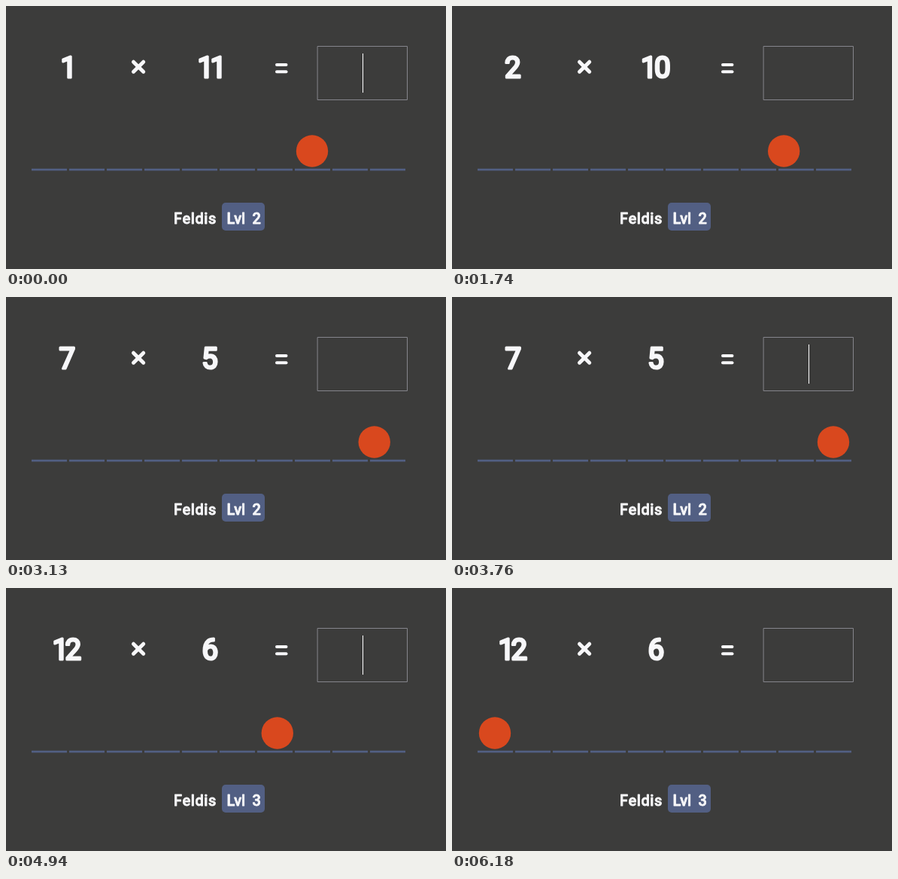
Write an HTML page with a canvas that moves like this. It is 585 by 349 pixels and loops after 6.71 s.

```html
<!DOCTYPE html>
<html lang="en">
<head>
<meta charset="utf-8">
<title>Times table practice</title>
<style>
  html, body { margin: 0; width: 100%; height: 100%; overflow: hidden; background: #3c3c3b; }
  canvas { display: block; }
</style>
</head>
<body>
<canvas id="stage" width="585" height="349"></canvas>
<script>
const ctx = document.getElementById('stage').getContext('2d');
const LOOP = 6710, MOVE = 1000;
const BG = '#3c3c3b', INK = '#f7f7f9', BLUE = '#525f83', RED = '#d9481e', EDGE = '#85858c';

// Each round: start time, factors, ball cell and level
const rounds = [
  { t: -MOVE, a: '1', b: '11', cell: 7, level: 2 },
  { t: 1340, a: '2', b: '10', cell: 8, level: 2 },
  { t: 2750, a: '7', b: '5', cell: 9, level: 2 },
  { t: 4728, a: '12', b: '6', cell: 0, level: 3 }
];

// Answer field: time, typed text, caret visible
const field = [
  [0, '', 1], [300, '', 0], [640, '1', 1], [840, '1', 0], [990, '11', 1], [1230, '11', 0],
  [1340, '', 1], [1375, '', 0], [1910, '', 1], [2270, '2', 1], [2480, '2', 0],
  [2510, '20', 1], [2670, '20', 0],
  [2750, '', 1], [3000, '', 0], [3530, '', 1], [4070, '', 0], [4200, '3', 1],
  [4430, '35', 1], [4580, '35', 0],
  [4728, '', 1], [5120, '', 0], [5650, '', 1], [6180, '', 0]
];

// cubic-bezier(.25, .1, .25, 1)
function ease(x) {
  if (x <= 0) return 0;
  if (x >= 1) return 1;
  let lo = 0, hi = 1;
  for (let i = 0; i < 24; i++) {
    const s = (lo + hi) / 2;
    if (0.75 * s * (1 - s) + s ** 3 < x) lo = s; else hi = s;
  }
  return 0.3 * (1 - lo) ** 2 * lo + 3 * (1 - lo) * lo * lo + lo ** 3;
}

const cellX = n => 57 + 50 * n;
const advance = c => c === '1' ? 17 : c === '0' ? 24 : 22;
const numberWidth = s => [...s].reduce((w, c) => w + advance(c), 0);

function softText(s, x, y, stroke) {
  ctx.lineWidth = stroke;
  ctx.strokeText(s, x, y);
  ctx.fillText(s, x, y);
}

function drawNumber(s, cx, y) {
  ctx.font = '400 38.5px Roboto, sans-serif';
  let x = cx - numberWidth(s) / 2;
  for (const c of s) {
    const m = ctx.measureText(c);
    const mid = (m.actualBoundingBoxRight - m.actualBoundingBoxLeft) / 2;
    softText(c, x + advance(c) / 2 - mid, y, 3);
    x += advance(c);
  }
}

function line(x1, y1, x2, y2, width) {
  ctx.lineWidth = width;
  ctx.beginPath();
  ctx.moveTo(x1, y1);
  ctx.lineTo(x2, y2);
  ctx.stroke();
}

function drawTrack(x) {
  ctx.fillStyle = BLUE;
  for (let i = 0; i < 10; i++) ctx.fillRect(34 + 50 * i, 215.8, 47, 2.7);
  ctx.fillStyle = RED;
  ctx.beginPath();
  ctx.arc(x, 192.5, 21.2, 0, Math.PI * 2);
  ctx.fill();
}

function drawLabel(level) {
  ctx.fillStyle = BLUE;
  ctx.beginPath();
  ctx.roundRect(287, 261, 57, 37, 5);
  ctx.fill();
  ctx.fillStyle = INK;
  ctx.font = '500 20px Roboto, sans-serif';
  ctx.letterSpacing = '0.6px';
  softText('Feldis', 223, 289, 0.8);
  ctx.letterSpacing = '0px';
  softText('Lvl', 293.5, 289, 0.8);
  softText(String(level), 327.5, 289, 0.8);
}

function draw(t) {
  const i = rounds.findLastIndex(r => r.t <= t);
  const round = rounds[i], from = cellX(rounds[Math.max(0, i - 1)].cell);
  const [, typed, caret] = field.findLast(f => f[0] <= t);

  ctx.fillStyle = BG;
  ctx.fillRect(0, 0, 585, 349);
  drawTrack(from + (cellX(round.cell) - from) * ease((t - round.t) / MOVE));

  ctx.lineWidth = 1;
  ctx.strokeStyle = EDGE;
  ctx.strokeRect(414.5, 53.5, 119, 71);

  ctx.fillStyle = ctx.strokeStyle = INK;
  ctx.lineCap = ctx.lineJoin = 'round';
  drawNumber(round.a, 81, 94.5);
  drawNumber(round.b, 271.6, 94.5);
  drawNumber(typed, 474, 104.5);
  line(169.5, 74.2, 182.7, 87.2, 5);
  line(182.7, 74.2, 169.5, 87.2, 5);
  line(360, 78, 372.5, 78, 4);
  line(360, 87.2, 372.5, 87.2, 4);
  drawLabel(round.level);

  if (caret) {
    ctx.fillStyle = '#fff';
    ctx.fillRect(Math.floor(474 + numberWidth(typed) / 2), 63, 1, 52);
  }
}

const start = performance.now();
function tick() {
  draw((performance.now() - start) % LOOP);
  requestAnimationFrame(tick);
}
tick();
</script>
</body>
</html>
```
